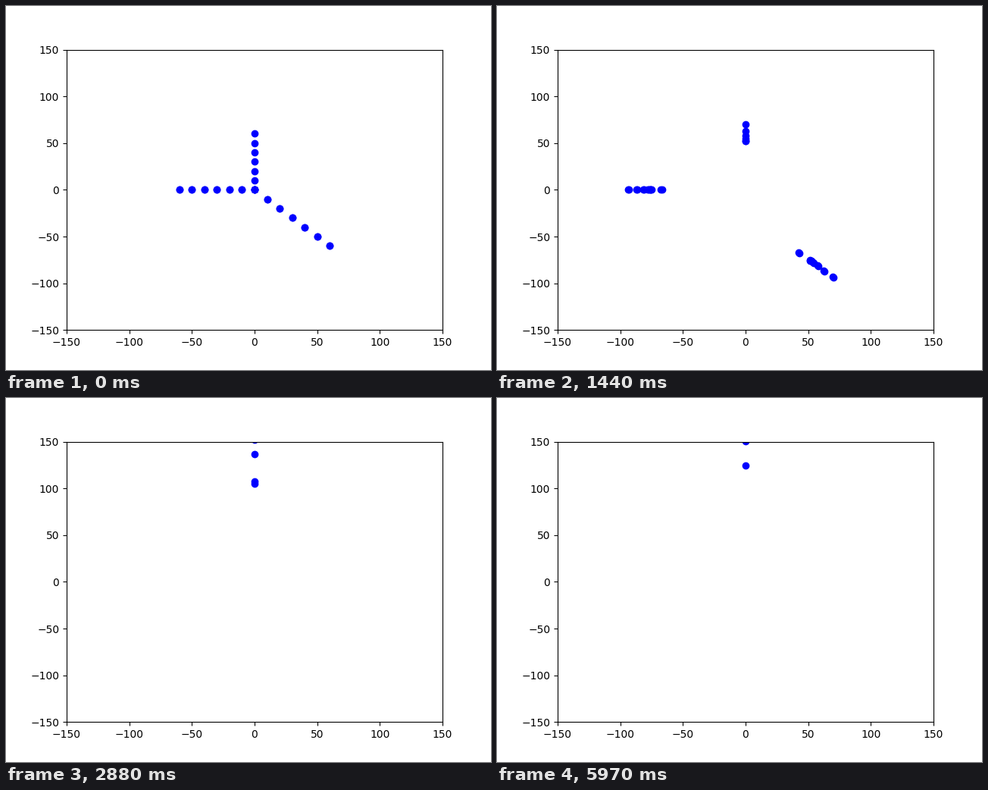
A matplotlib script for the animation above (6000 ms loop, 640 px wide and 480 px high).

```python
import numpy as np
import matplotlib.pyplot as plt
from matplotlib.animation import FuncAnimation

FRAMES, INTERVAL = 200, 30
MEET, PART = 48, 77      # the row bunches up, then has spread out again
LIMIT, DECAY = 159, 58   # the two slowest particles creep towards LIMIT

# Six particles in a row, outermost first; the inner ones get flung out hardest.
i = np.arange(6)
KEYS = np.array([0, 32, MEET, PART])
start = 60 - 10 * i
POSES = np.array([
    start,
    start + 4.5 + 1.6 * i + 0.1 * i**2,
    70 - 7.6 * i + 0.8 * i**2,
    84.5 + 3.1 * i**2,
])
SLOPES = np.zeros_like(POSES)
SLOPES[1:-1] = (POSES[2:] - POSES[:-2]) / (KEYS[2:] - KEYS[:-2])[:, None]
SLOPES[-1] = np.where(i < 2, (LIMIT - POSES[-1]) / DECAY, 2.1)


def smooth(t, a, b):
    s = np.clip((t - a) / (b - a), 0, 1)
    return s * s * (3 - 2 * s)


def hermite(t):
    k = np.searchsorted(KEYS, t, side="right") - 1
    h = KEYS[k + 1] - KEYS[k]
    s = (t - KEYS[k]) / h
    return ((1 + 2 * s) * (1 - s)**2 * POSES[k] + s * (1 - s)**2 * h * SLOPES[k]
            + s * s * (3 - 2 * s) * POSES[k + 1] + s * s * (s - 1) * h * SLOPES[k + 1])


def row(t):
    if t < PART:
        return hermite(t)
    drift = POSES[-1] + SLOPES[-1] * (t - PART)
    creep = LIMIT - (LIMIT - POSES[-1]) * np.exp(-(t - PART) / DECAY)
    x = np.where(i < 2, creep, drift)
    x[0] -= 25 * smooth(t, 165, 189)
    return x


def positions(t):
    up = row(t)
    # The centre particle appears in the two lower views only.
    x = np.append(up, t * (0.45 + 0.0093 * t))
    z = -np.append(up + t * (0.46 + 0.0008 * t), t * (0.83 + 0.012 * t))
    # Close companions split off and merge again.
    gap = 0.7 * smooth(t, 0, 32) * (1 - smooth(t, 60, PART))
    x = np.concatenate([x, x - gap])
    z = np.concatenate([z, z + gap])
    return (np.concatenate([np.zeros_like(up), z, x]),
            np.concatenate([up, np.zeros_like(z), z]))


fig, ax = plt.subplots(figsize=(6.4, 4.8), dpi=100)
ax.set_xlim(-150, 150)
ax.set_ylim(-150, 150)
dots, = ax.plot([], [], "bo")


def update(t):
    dots.set_data(*positions(t))
    return dots,


anim = FuncAnimation(fig, update, frames=FRAMES, interval=INTERVAL,
                     repeat=True, repeat_delay=0)
plt.show()
```
